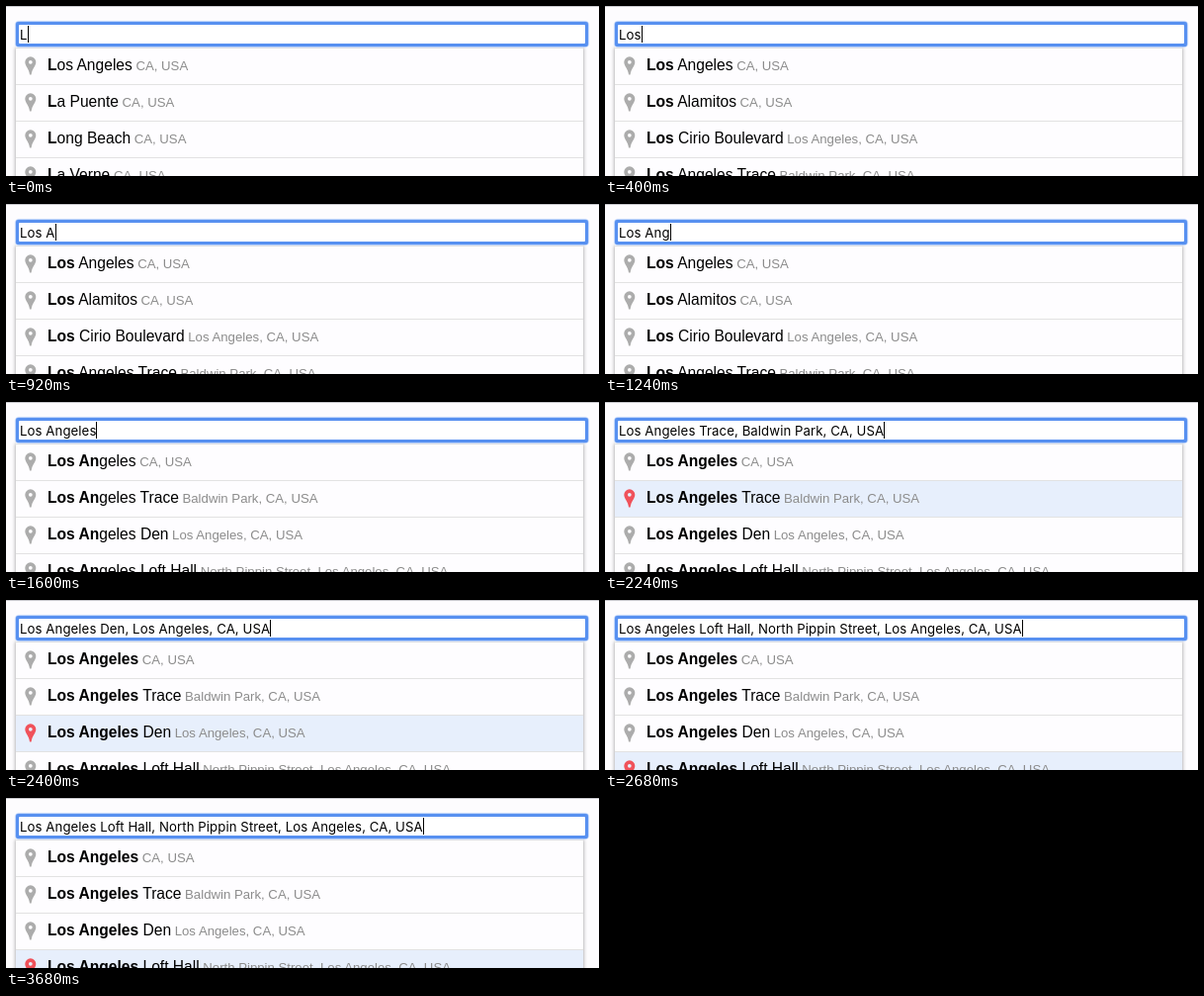
An HTML page that plays this animation: 600x172 px, repeating every 3.92 s.

```html
<!DOCTYPE html>
<html lang="en">
<head>
<meta charset="utf-8">
<title>Place search</title>
<style>
html, body { margin: 0; width: 100%; height: 100%; overflow: hidden; }
body { position: relative; background: #fdfcfe; font-family: "Liberation Sans", Arial, sans-serif; }
.rule { position: absolute; left: 0; right: 0; top: 0; height: 1px; background: #cfcfd4; }
.field {
  position: absolute; left: 13px; top: 19px; width: 573px; height: 19px;
  background: #fff; border-radius: 1px; z-index: 2;
  box-shadow: 0 0 0 3px #5790f0, 0 0 1px 3.5px #82aef6;
  font: 13.2px/20px Inter, sans-serif; letter-spacing: .08px; color: #000; white-space: pre;
}
.field span { position: absolute; left: 1px; top: 0; }
.field b { font-weight: 400; }
.field i { position: absolute; left: 100%; top: 1px; width: 1px; height: 17px; background: #000; }
.menu {
  position: absolute; left: 10px; top: 41px; width: 574px; height: 150px;
  background: #fefdff; box-shadow: 0 1px 4px rgba(0, 0, 0, .42);
}
.row {
  position: absolute; left: 0; right: 0; height: 36px; padding-left: 32px;
  border-top: 1px solid #e2e2e2; font-size: 15.6px; line-height: 34px;
  color: #000; white-space: pre;
}
.row small { margin-left: 3.6px; font-size: 13.2px; color: #8c8c8c; }
.row svg { position: absolute; left: 8px; top: 7px; fill: #acacac; }
.row.on { background: #e7effc; }
.row.on svg { fill: #f0525a; }
</style>
</head>
<body>
<div class="rule"></div>
<div class="menu" id="menu"></div>
<div class="field"><span><b id="typed"></b><i id="caret"></i></span></div>
<script>
const LOOP = 3920;
const LA = "Los Angeles", CITY = "CA, USA", IN_LA = LA + ", " + CITY;
const trace = [LA + " Trace", "Baldwin Park, " + CITY];
const places = {
  l: [[LA, CITY], ["La Puente", CITY], ["Long Beach", CITY], ["La Verne", CITY]],
  los: [[LA, CITY], ["Los Alamitos", CITY], ["Los Cirio Boulevard", IN_LA], trace],
  an: [[LA, CITY], trace, [LA + " Den", IN_LA], [LA + " Loft Hall", "North Pippin Street, " + IN_LA]]
};

// start time, field text, list, bold letters, selected row
const steps = [
  [0, "L", "l", 1, -1],
  [40, "Lo", "l", 1, -1],
  [240, "Los", "l", 1, -1],
  [360, "Los", "los", 3, -1],
  [480, "Los ", "los", 3, -1],
  [920, "Los A", "los", 3, -1],
  [1080, "Los An", "los", 3, -1],
  [1160, "Los Ang", "los", 3, -1],
  [1280, "Los Ange", "los", 3, -1],
  [1320, "Los Ange", "an", 6, -1],
  [1360, "Los Angel", "an", 6, -1],
  [1480, "Los Angele", "an", 6, -1],
  [1600, LA, "an", 6, -1],
  [1880, LA, "an", 11, -1]
];
[1960, 2200, 2360, 2600].forEach((t, i) =>
  steps.push([t, places.an[i].join(", "), "an", 11, i]));

const $ = id => document.getElementById(id);
const pin = '<svg width="14" height="22" viewBox="0 0 14 22"><path fill-rule="evenodd" ' +
  'd="M6.8 1.3a5.5 5.5 0 0 0-5.5 5.5C1.3 11 5.2 13 6 19.4h1.6C8.4 13 12.3 11 12.3 6.8A5.5 5.5 0 0 0 6.8 1.3z' +
  'M6.8 4.9a1.9 1.9 0 1 1 0 3.8a1.9 1.9 0 0 1 0-3.8z"/></svg>';

function rowHtml([name, area], i, bold, selected) {
  return `<div class="row${i === selected ? " on" : ""}" style="top:${1 + 37 * i}px">${pin}` +
    `<b>${name.slice(0, bold)}</b>${name.slice(bold)}<small>${area}</small></div>`;
}

let shown;
function show(step) {
  if (step === shown) return;
  shown = step;
  const [, text, list, bold, selected] = step;
  $("typed").textContent = text;
  $("menu").innerHTML = places[list].map((p, i) => rowHtml(p, i, bold, selected)).join("");
}

const start = performance.now();
function draw(now) {
  const t = Math.max(0, now - start) % LOOP;
  show(steps.filter(s => s[0] <= t).pop());
  $("caret").style.visibility = t >= 3160 && t < 3680 ? "hidden" : "visible";
  requestAnimationFrame(draw);
}
draw(start);
</script>
</body>
</html>
```
